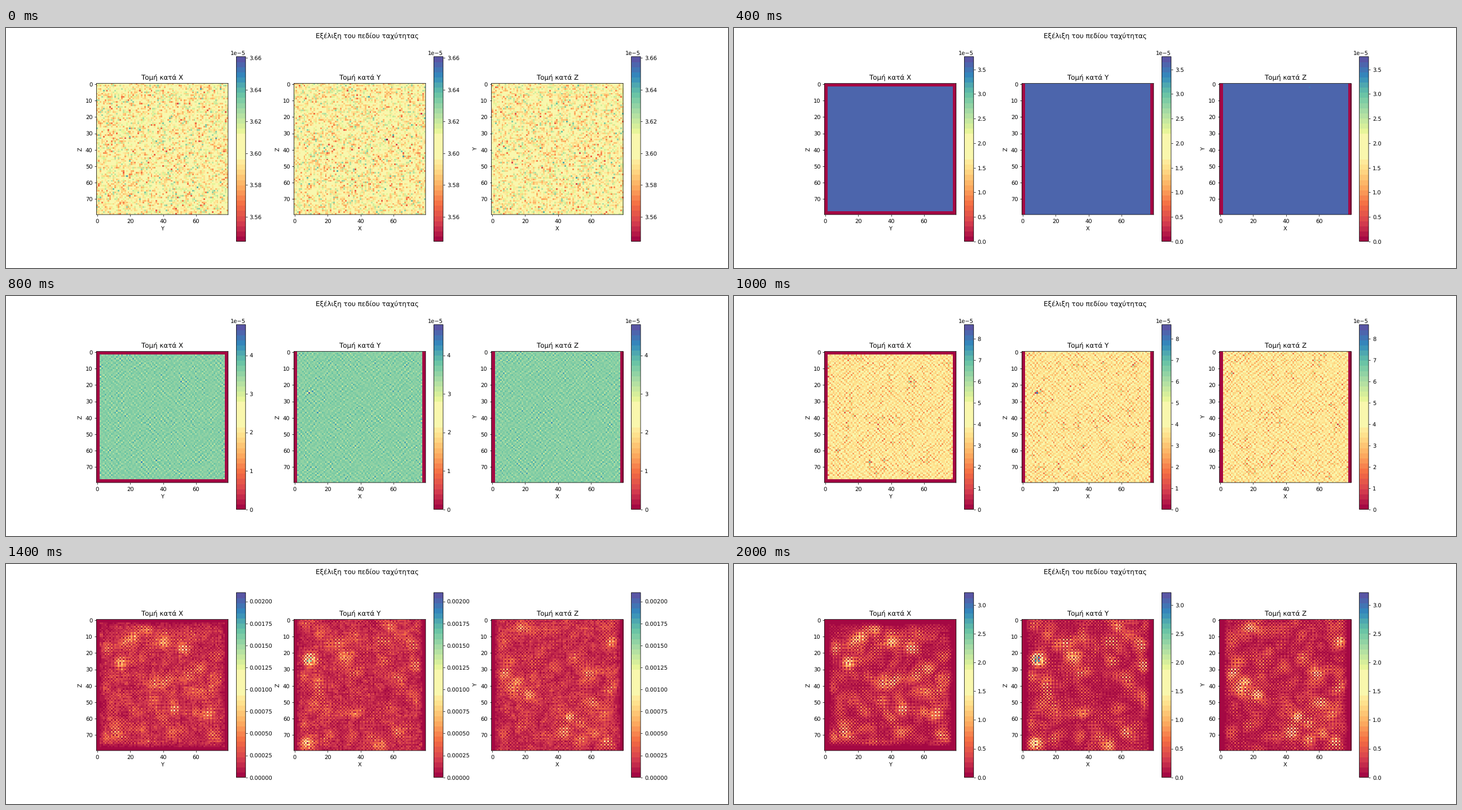
Animation, 1280 px wide and 427 px high, one loop 2.2 s. Source, as a matplotlib script:

```python
import numpy as np
import matplotlib.pyplot as plt
from matplotlib.animation import FuncAnimation
from matplotlib.colors import ListedColormap

N = 80
MEAN = 3.6
REST = 0.0122   # noise strength before the instability grows
UNIT = 1e-5
LOW = 3.5444    # colour-scale minimum of the first step

# Colour-scale maximum of each step, in UNIT
VMAX = [3.6608, 3.762, 3.762, 4.003, 4.8, 8.67, 31.1, 210, 2177, 25600, 321300]

plt.rcParams.update({"path.snap": False, "text.hinting": "none"})
yy, xx = np.mgrid[:N, :N]


def band(rng, k, width):
    """Unit-variance noise around the wave numbers (+-k, +-k)."""
    f = np.abs(np.fft.fftfreq(N))
    g = np.exp(-(f - k) ** 2 / (2 * width ** 2))
    spec = np.fft.fft2(rng.standard_normal((N, N))) * np.outer(g, g)
    out = np.fft.ifft2(spec).real
    return out / out.std()


def blob(x, y, amp, size=2.5):
    return amp * np.exp(-((xx - x) ** 2 + (yy - y) ** 2) / (2 * size ** 2))


def stepped_cmap(levels=36):
    colors = plt.get_cmap("Spectral")((np.arange(levels) + 0.5) / levels)
    colors[16:21] = (0.975, 0.970, 0.680, 1)
    return ListedColormap(colors)


class Slice:
    """One cut through the field: the first spot is the hottest."""

    def __init__(self, seed, spots, peak, boxed=False):
        rng = np.random.default_rng(seed)
        self.white = [rng.standard_normal((N, N)) for _ in range(3)]
        self.waves = [band(rng, 0.36, 0.1) for _ in range(2)]

        heat = blob(*spots[0], peak) + sum(blob(*s, 0.4) for s in spots[1:])
        self.gain = 0.9 + 2 * heat ** 2
        for _ in range(45):
            heat = heat + blob(*rng.uniform(4, 76, 2), rng.uniform(0.05, 0.25))

        # Alternating-cell pattern under a smooth envelope
        env = 0.07 + 0.08 * np.abs(band(rng, 0, 0.06)) + heat
        checker, cols, rows = (np.tanh(1.5 * band(rng, 0, 0.06))
                               for _ in range(3))
        sx, sy = (-1.0) ** xx, (-1.0) ** yy
        self.late = np.minimum(env, 1) * np.abs(
            0.45 + 0.4 * checker * sx * sy + 0.15 * (cols * sx + rows * sy))

        edge = np.minimum(xx, N - 1 - xx)
        if boxed:
            edge = np.minimum(edge, np.minimum(yy, N - 1 - yy))
        self.inside = edge >= 2
        self.taper = 1 - np.exp(-(np.maximum(edge - 1, 0) / 2.6) ** 2)

    def field(self, i):
        if i < 3:
            noise = MEAN + REST * self.white[i]
            return noise if i == 0 else self.inside * noise
        u, v = (w * self.gain for w in self.waves)
        if i < 7:
            s = 0.14 * (VMAX[i] - MEAN)
            return self.inside * np.hypot(MEAN + s * u, 0.7 * s * v)
        share = 0.3 ** (i - 6)
        waves = 0.12 * np.hypot(u, 0.7 * v)
        mix = (1 - share) * self.late * self.taper + share * waves
        return self.inside * VMAX[i] * mix


slices = [
    Slice(11, [(52, 17), (40, 14), (67, 57), (47, 54), (14, 27), (22, 10)],
          0.5, boxed=True),
    Slice(22, [(9, 24), (74, 28), (63, 68), (8, 74), (29, 22), (58, 4)], 0.95),
    Slice(33, [(73, 13), (58, 32), (15, 38), (46, 59), (69, 74), (17, 5)], 0.5),
]

dpi = 1280 / 18
fig, axes = plt.subplots(1, 3, figsize=(18, 427.001 / dpi), dpi=dpi)
nudge = 0.36    # pixels, right and up
dx, dy = nudge / 1280, nudge / 427
fig.subplots_adjust(left=0.125 + dx, right=0.9 + dx,
                    bottom=0.11 + dy, top=0.88 + dy)
fig.suptitle("Εξέλιξη του πεδίου ταχύτητας")
cmap = stepped_cmap()

images = []
for ax, part, (cut, across, down) in zip(axes, slices, ("XYZ", "YXZ", "ZXY")):
    im = ax.imshow(part.field(0) * UNIT, cmap=cmap, interpolation="nearest",
                   vmin=LOW * UNIT, vmax=VMAX[0] * UNIT)
    ax.set(title=f"Τομή κατά {cut}", xlabel=across, ylabel=down)
    fig.colorbar(im, ax=ax)
    images.append(im)


def update(i):
    low = LOW if i == 0 else 0
    for im, part in zip(images, slices):
        im.set_data(part.field(i) * UNIT)
        im.set_clim(low * UNIT, VMAX[i] * UNIT)
    return images


anim = FuncAnimation(fig, update, frames=len(VMAX), interval=200,
                     repeat=True, repeat_delay=0)
plt.show()
```
